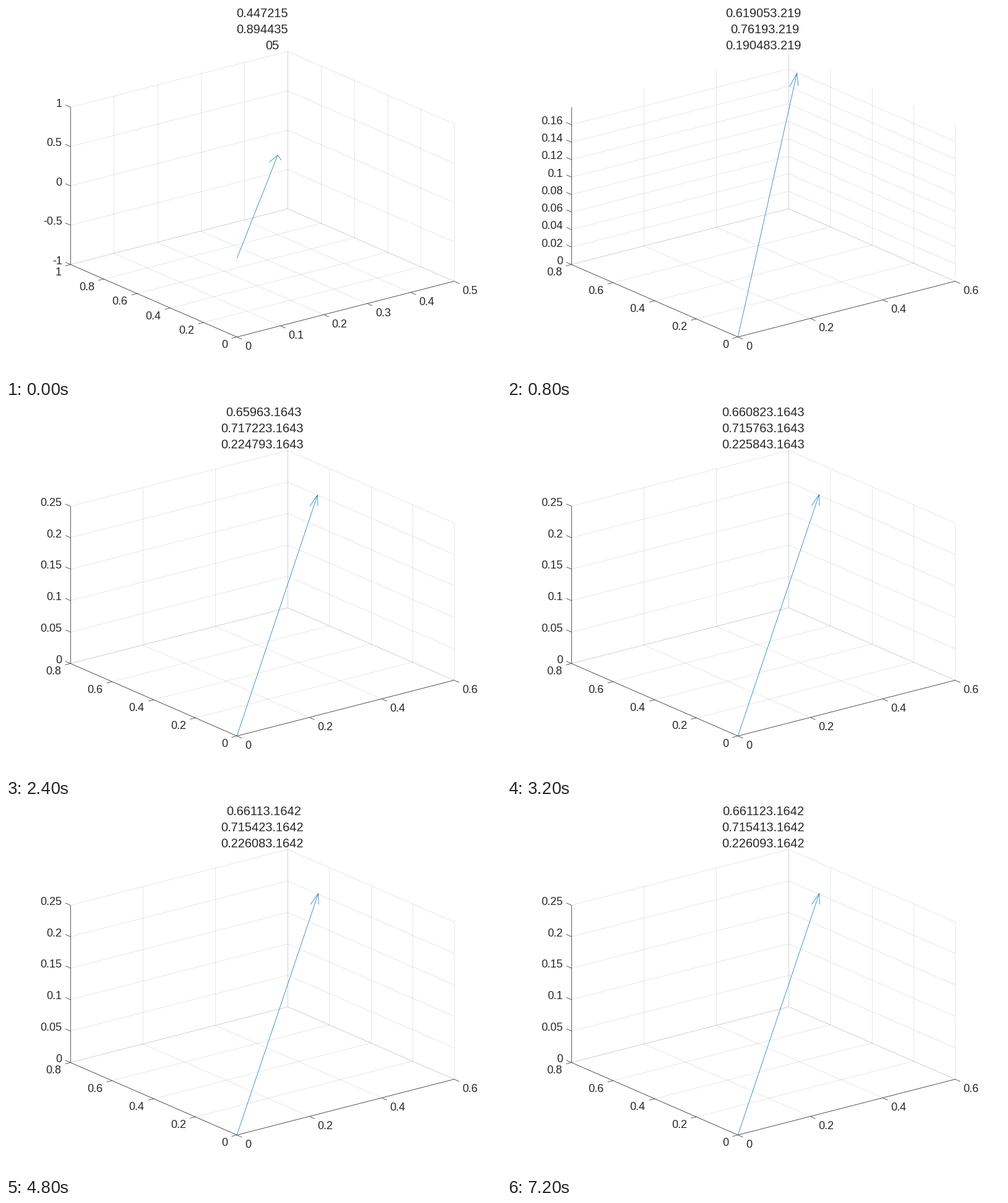
These frames come from a looping animation (800x599 px, 8000 ms). A matplotlib script:

```python
import math

import numpy as np
import matplotlib.pyplot as plt
from matplotlib.animation import FuncAnimation
from matplotlib.collections import LineCollection

W, H, DPI = 800, 599, 64
PX = 72 / DPI
STEPS, INTERVAL = 20, 400

A = np.array([[1, 2, 0], [2, 1, 1], [0, 1, 0]], float)
SCALE = 0.9

# Screen projection of the unit box
ORIGIN = np.array([373.2, 534.4])
AXES = np.array([[351, -90], [-269, -117], [0, -254]], float)
UX, UY = (v / np.hypot(*v) for v in AXES[:2])

INK = (0.15, 0.15, 0.15)
BLUE = (0, 0.447, 0.741)
LINE = 0.72
TITLE = 20
SPACE = 0.278 * TITLE

plt.rcParams["font.family"] = "Liberation Sans"
fig = plt.figure(figsize=(W / DPI, H / DPI), dpi=DPI, facecolor="white")
ax = fig.add_axes([0, 0, 1, 1])


def power_step(k):
    """Unit vector and eigenvalue estimate after k + 1 multiplications."""
    x = np.array([1.0, 0, 0])
    for _ in range(k + 1):
        old = x / np.linalg.norm(x)
        x = A @ old
    return x / np.linalg.norm(x), x @ x / (x @ old)


def ticks_for(top, most):
    """Lower limit, upper limit and ticks, with at most `most` steps."""
    if top < 1e-9:
        return -1, 1, np.linspace(-1, 1, 5)
    for step in (0.01, 0.02, 0.05, 0.1, 0.2, 0.5):
        n = math.ceil(top / step - 1e-9)
        if n <= most:
            break
    # a full set of nine steps loses its top tick
    count = n if n == 9 else n + 1
    return 0, n * step, step * np.arange(count)


def project(x, y, z):
    return ORIGIN + np.array([x, y, z]) @ AXES


def lines(segs, color, alpha=1.0):
    ax.add_collection(LineCollection(segs, colors=[color], alpha=alpha,
                                     linewidths=LINE * PX))


def label(p, text, size=18, ha="right"):
    ax.text(p[0], p[1], text, fontsize=size * PX, ha=ha, va="baseline",
            color=INK)


def draw_box(fx, fy, fz, ticks):
    grid = []
    for x in fx:
        grid += [[project(x, 0, 0), project(x, 1, 0)],
                 [project(x, 1, 0), project(x, 1, 1)]]
    for y in fy:
        grid += [[project(0, y, 0), project(1, y, 0)],
                 [project(1, y, 0), project(1, y, 1)]]
    for z in fz:
        grid += [[project(0, 1, z), project(1, 1, z)],
                 [project(1, 1, z), project(1, 0, z)]]
    lines(grid, INK, alpha=0.15)

    o = project(0, 0, 0)
    left = project(0, 1, 0)
    rules = [[o, project(1, 0, 0)], [o, left], [left, project(0, 1, 1)]]
    rows = [(project(x, 0, 0), -UY * 9, (13, 20.4), "left") for x in fx]
    rows += [(project(0, y, 0), -UX * 9, (-15, 18), "right") for y in fy]
    rows += [(project(0, 1, z), UY * 9, (-13.5, -0.6), "right") for z in fz]
    for (p, tick, shift, ha), v in zip(rows, np.concatenate(ticks)):
        rules.append([p, p + tick])
        label(p + shift, f"{v:.4g}", ha=ha)
    lines(rules, INK)


def draw_arrow(vec, to_screen, height):
    u, v, w = vec
    alpha = 0.058 if w < 1e-9 else 0.0265 + 0.024 * height
    side = 0.245 * np.array([v, -u, 0])
    tip = to_screen(vec)
    ends = [to_screen(vec - alpha * (vec + s * side)) for s in (1, -1)]
    lines([[to_screen(np.zeros(3)), tip], [ends[0], tip, ends[1]]], BLUE)


def draw_title(v, lam):
    """Rows of a character matrix: values padded on the left, centred."""
    values = [f"{c:.5g}" for c in v]
    widest = max(map(len, values))
    for i, text in enumerate(values):
        pad = (widest - len(text)) * SPACE
        label((414 + pad / 2, 18 + 26 * i), f"{text}{lam:.5g}", TITLE, "center")


def draw(k):
    ax.clear()
    ax.set(xlim=(0, W), ylim=(H, 0))
    ax.axis("off")

    v, lam = power_step(k)
    vec = SCALE * v
    scales = [ticks_for(c, n) for c, n in zip(vec, (5, 5, 9))]
    lo = np.array([s[0] for s in scales])
    span = np.array([s[1] for s in scales]) - lo
    ticks = [s[2] for s in scales]

    def to_screen(p):
        return project(*((p - lo) / span))

    draw_box(*[(t - a) / d for t, a, d in zip(ticks, lo, span)], ticks)
    draw_arrow(vec, to_screen, vec[2] / span[2])
    draw_title(v, lam)
    return []


anim = FuncAnimation(fig, draw, frames=STEPS, interval=INTERVAL,
                     init_func=lambda: draw(0), repeat=True, repeat_delay=0)
plt.show()
```
